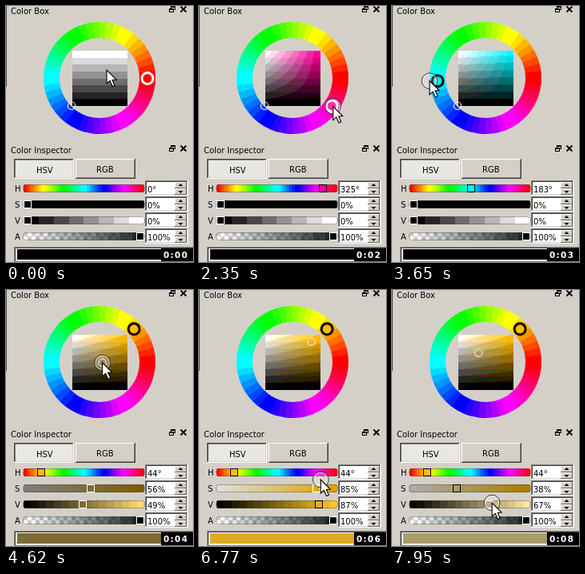
Write an HTML page with a canvas that moves like this. It is 234 px wide and 320 px high and loops after 8 s.

```html
<!DOCTYPE html>
<html lang="en">
<head>
<meta charset="utf-8">
<title>Color Box</title>
<style>
html, body { margin: 0; width: 100%; height: 100%; overflow: hidden; background: #d4d0c8; }
canvas { display: block; width: 234px; height: 320px; }
</style>
</head>
<body>
<canvas id="stage"></canvas>
<script>
const LOOP = 8000, W = 234, H = 320, FACE = '#d4d0c8', TAU = 2 * Math.PI;
const FONT = '"DejaVu Sans", Verdana, sans-serif';
const WHEEL = { x: 117, y: 90, r: 60, width: 20 };
const SQ = { x: 83, y: 56, size: 69 };
const TRACK = { x: 22, w: 151 };
const rowY = name => 228 + 20 * 'HSVA'.indexOf(name);
const ARROW = new Path2D('M0 0V17L4 13.4L7.2 20.5L10 19.2L7 12.4L12 12Z');

const stage = document.getElementById('stage');
const dpr = window.devicePixelRatio || 1;
stage.width = W * dpr;
stage.height = H * dpr;
const g = stage.getContext('2d');
g.scale(dpr, dpr);

// Times at which the mouse button goes down and up on each control.
const PRESS = { ring: [2200, 4180], square: [4440, 4890], sat: [6650, 7390], val: [7620, LOOP] };

const ramp = (t, a, b) => Math.min(1, Math.max(0, (t - a) / (b - a)));
const smooth = k => k * k * (3 - 2 * k);
const since = (t, name) => +(t >= PRESS[name][0]);
const mix = (a, b, k) => a.map((v, i) => v + (b[i] - v) * k);

function colorAt(t) {
  const drag = ramp(t, 4640, 4850);
  return {
    hue: since(t, 'ring') ? 325 - 142 * ramp(t, 2620, 3480) - 139 * ramp(t, 3660, 4150) : -1,
    s: .56 * since(t, 'square') + .34 * drag - .05 * since(t, 'sat') - .47 * ramp(t, 6880, 7350),
    v: .49 * since(t, 'square') + .38 * drag - .19 * since(t, 'val') - .01 * ramp(t, 7720, 7900)
  };
}

function onWheel(hue, r) {
  const a = hue * TAU / 360;
  return [WHEEL.x + r * Math.cos(a), WHEEL.y - r * Math.sin(a)];
}
const onSquare = ({ s, v }) => [82 + SQ.size * s, 124.7 - SQ.size * v];

// The mouse visits the controls in turn and sits where each value is.
function mouseAt(t) {
  const stateOn = name => colorAt(Math.max(t, PRESS[name][0]));
  const over = ramp(t, 3660, 4150);
  const reach = WHEEL.r + 2 + 8 * ramp(t, 2620, 3480) - 8 * over + 7 * Math.sin(Math.PI * over);
  const idle = [
    126 + 22 * Math.sin(TAU * ramp(t, 120, 900)) - 46 * ramp(t, 880, 1180),
    80 + 41 * ramp(t, 120, 1180)
  ];
  const sat = [
    24 + 151 * stateOn('sat').s + 14 * Math.sin(TAU * ramp(t, 5190, 6010)),
    247 - 10 * smooth(ramp(t, 6200, 6600)) + 8 * ramp(t, 6880, 7350)
  ];
  const val = [24 + 151 * stateOn('val').v, 266];
  let p = mix(idle, onWheel(stateOn('ring').hue, reach), smooth(ramp(t, 1180, 2150)));
  p = mix(p, onSquare(stateOn('square')), smooth(ramp(t, 4180, 4400)));
  p = mix(p, sat, 1 - (1 - ramp(t, 4890, 6010)) ** 4);
  return mix(p, val, smooth(ramp(t, 7390, 7600)));
}

function hsv(h, s, v) {
  const f = n => {
    const k = (n + h / 60) % 6;
    return v - v * s * Math.max(0, Math.min(k, 4 - k, 1));
  };
  return [f(5), f(3), f(1)];
}
const css = c => `rgb(${c.map(v => Math.round(v * 255)).join()})`;
const luma = ([r, gr, b]) => .3 * r + .59 * gr + .11 * b;

const stepped = (k, n) => Math.min(n - 1, Math.floor(k * n + 1e-6)) / (n - 1);
const banded = c => css(c.map(v => stepped(v, 8)));

function box(x, y, w, h, fill) {
  g.fillStyle = fill;
  g.fillRect(x, y, w, h);
}
function bevel(x, y, w, h, light, dark) {
  box(x, y, w, 1, light);
  box(x, y, 1, h, light);
  box(x, y + h - 1, w, 1, dark);
  box(x + w - 1, y, 1, h, dark);
}
function label(s, x, y, font = '10px', fill = '#000') {
  g.font = `${font} ${FONT}`;
  g.fillStyle = fill;
  g.fillText(s, x, y);
}
function ring(x, y, r, width, stroke, fill) {
  g.beginPath();
  g.arc(x, y, r, 0, TAU);
  if (fill) { g.fillStyle = fill; g.fill(); }
  g.lineWidth = width;
  g.strokeStyle = stroke;
  g.stroke();
}

function titleBar(name, y) {
  label(name, 6, y + 6);
  g.strokeStyle = '#000';
  g.lineWidth = 1;
  for (const [x, top] of [[206, y - 4], [204, y - 1]]) {
    box(x, top, 6, 5, FACE);
    g.strokeRect(x + .5, top + .5, 5, 4);
    box(x, top, 6, 2, '#000');
  }
  g.lineWidth = 1.8;
  g.beginPath();
  for (const d of [-3.5, 3.5]) {
    g.moveTo(222 - d, y - 3.5);
    g.lineTo(222 + d, y + 3.5);
  }
  g.stroke();
}

function tabs() {
  box(10, 191, 75, 25, FACE);
  for (let y = 191; y < 216; y++) {
    for (let x = 10 + y % 2; x < 85; x += 2) box(x, y, 1, 1, '#fff');
  }
  bevel(10, 191, 75, 25, '#404040', '#fff');
  bevel(11, 192, 73, 23, '#808080', FACE);
  label('HSV', 38, 209);
  bevel(87, 191, 75, 25, '#fff', '#404040');
  bevel(88, 192, 73, 23, FACE, '#808080');
  label('RGB', 113, 208);
}

function wheel() {
  const step = 7.5, rad = TAU / 360;
  g.lineWidth = WHEEL.width;
  for (let h = 0; h < 360; h += step) {
    g.beginPath();
    g.arc(WHEEL.x, WHEEL.y, WHEEL.r, -h * rad, -(h + step + .5) * rad, true);
    g.strokeStyle = banded(hsv(h + step / 2, 1, 1));
    g.stroke();
  }
}

const patch = document.createElement('canvas');
patch.width = patch.height = SQ.size;
const pg = patch.getContext('2d');
let patchHue = null;
function square(hue) {
  if (hue !== patchHue) {
    patchHue = hue;
    for (let y = 0; y < SQ.size; y++) {
      for (let x = 0; x < SQ.size; x++) {
        const s = hue < 0 ? 0 : x / SQ.size;
        pg.fillStyle = banded(hsv(Math.max(0, hue), s, 1 - (y + .5) / SQ.size));
        pg.fillRect(x, y, 1, 1);
      }
    }
  }
  g.drawImage(patch, SQ.x, SQ.y);
}

function slider(name, text, color, handle) {
  const cy = rowY(name), top = cy - 5;
  label(name, 11, cy + 4);
  g.save();
  g.beginPath();
  g.roundRect(TRACK.x - 1, top, TRACK.w + 2, 10, 4);
  g.clip();
  for (let i = 0; i < TRACK.w; i++) {
    if (name === 'A') {
      for (let j = 0; j < 2; j++) {
        box(TRACK.x + i, top + 5 * j, 1, 5, (Math.floor(i / 5) + j) % 2 ? '#fff' : '#ccccc8');
      }
    }
    box(TRACK.x + i, top, 1, 10, color((i + .5) / TRACK.w));
  }
  g.restore();
  g.beginPath();
  g.roundRect(TRACK.x - .5, top + .5, TRACK.w + 1, 9, 3.5);
  g.strokeStyle = 'rgba(70,70,70,.45)';
  g.lineWidth = 1;
  g.stroke();
  if (handle) {
    const x = Math.round(27 + 141 * handle.pos);
    box(x - 5, cy - 5, 10, 10, handle.light ? '#fff' : '#000');
    box(x - 4, cy - 4, 8, 8, handle.fill);
  }
  spinner(text, cy);
}

function spinner(text, cy) {
  const y = cy - 10;
  box(174, y, 54, 19, '#fff');
  bevel(174, y, 54, 19, '#808080', '#fff');
  bevel(175, y + 1, 52, 17, '#404040', FACE);
  label(text, 177, cy + 5);
  for (const dir of [-1, 1]) {
    const mid = cy + 4 * dir;
    box(211, mid - 4, 15, 8, FACE);
    bevel(211, mid - 4, 15, 8, '#fff', '#606060');
    g.fillStyle = '#000';
    g.beginPath();
    g.moveTo(215.5, mid - dir);
    g.lineTo(221.5, mid - dir);
    g.lineTo(218.5, mid + 2 * dir);
    g.fill();
  }
}

function colorBar(fill) {
  box(10, 301, 224, 19, '#808080');
  box(11, 302, 223, 17, '#404040');
  box(12, 303, 222, 16, '#fff');
  box(14, 304, 220, 13, fill);
}

function timer(t) {
  box(194, 303, 40, 16, '#000');
  const sec = Math.max(0, Math.floor((t - 265) / 960));
  g.letterSpacing = '1.3px';
  label('0:0' + sec, 197, 315, 'bold 10.5px', '#fff');
  g.letterSpacing = '0px';
}

function pointer([x, y], down) {
  if (down) {
    ring(x, y, 8.8, 1.2, 'rgba(255,255,255,.75)', 'rgba(255,255,255,.2)');
    ring(x, y, 9.8, 1, '#333');
  }
  g.save();
  g.translate(x, y);
  g.fillStyle = '#fff';
  g.fill(ARROW);
  g.strokeStyle = '#000';
  g.lineWidth = 1.1;
  g.stroke(ARROW);
  g.restore();
}

function draw(t) {
  const { hue, s, v } = colorAt(t);
  const h = Math.max(0, hue), pure = hsv(h, 1, 1), now = hsv(h, s, v);
  const mouse = mouseAt(t);
  const down = Object.values(PRESS).some(([a, b]) => t >= a && t < b);
  const pct = n => Math.round(n * 100) + '%';
  const steps = s > 0 ? 16 : 8;
  const handle = (name, pos) => ({
    pos, fill: css(now),
    light: luma(now) < .45 || Math.abs(mouse[1] - rowY(name)) < 12
  });

  box(0, 0, W, H, FACE);
  box(0, 0, 1, 101, '#505050');
  titleBar('Color Box', 4);
  titleBar('Color Inspector', 178);
  wheel();
  square(hue);
  const [rx, ry] = onWheel(h, WHEEL.r);
  ring(rx, ry + .5, 7, 3, luma(pure) > .5 ? '#000' : '#fff', css(pure));
  ring(...onSquare({ s, v }), 4.7, 1.2, '#e8e6e0');

  tabs();
  slider('H', Math.round(h) + '°', k => banded(hsv(k * 360, 1, 1)),
    hue >= 0 && { pos: h / 359, fill: css(pure), light: false });
  slider('S', pct(s), k => css(hsv(h, stepped(k, steps), v)), handle('S', s));
  slider('V', pct(v), k => css(hsv(h, s, stepped(k, steps))), handle('V', v));
  slider('A', '100%', k => `rgba(22,30,30,${stepped(k, 10) * .96})`,
    { pos: 1, fill: '#000', light: true });
  colorBar(css(now));
  pointer(mouse, down);
  timer(t);
}

const start = performance.now();
function tick() {
  draw((performance.now() - start) % LOOP);
  requestAnimationFrame(tick);
}
tick();
</script>
</body>
</html>
```
